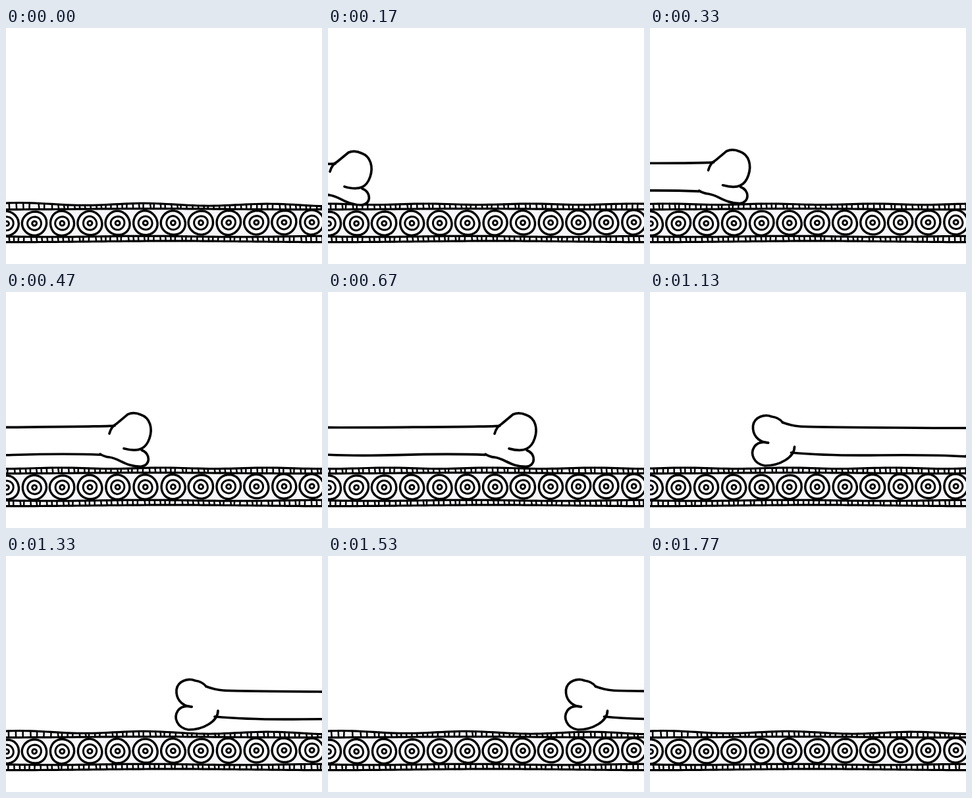
An HTML page with a canvas for the animation above (1.81 s loop, 480 px wide and 360 px high).

```html
<!DOCTYPE html>
<html>
<head>
<meta charset="utf-8">
<title>Bone on a conveyor belt</title>
<style>
html, body { margin: 0; width: 100%; height: 100%; overflow: hidden; background: #fff; }
canvas { display: block; }
</style>
</head>
<body>
<canvas id="stage" width="480" height="360"></canvas>
<script>
const ctx = document.getElementById('stage').getContext('2d');
const LOOP = 1810, STEP = 100 / 3;
ctx.lineCap = ctx.lineJoin = 'round';

// Bone outline, drawn with its right edge at x = 456
const bone = [
  'M99 199Q112 204 125 205T270 207T400 207',
  'M392 219Q395 208 403 204L420 190Q429 186 440 191C454 196 458 212 453 227C448 242 438 249 414 242',
  'M441 245C455 250 455 269 440 270C417 270 407 257 392 255Q384 254 378 250',
  'M378 251Q325 248 245 249T112 245',
  'M117 236C117 252 95 265 72 265C55 262 49 247 56 236C61 229 69 228 77 230',
  'M77 230C60 229 53 216 54 204C56 190 72 186 82 190C90 191 96 195 99 199'
].map(d => new Path2D(d));

// Right edge of the bone at a few steps
const keys = [[5, 67], [14, 221], [20, 317], [28, 456], [40, 661]];

function boneX(i) {
  let k = 1;
  while (k < keys.length - 1 && i > keys[k][0]) k++;
  const [[i0, x0], [i1, x1]] = [keys[k - 1], keys[k]];
  return x0 + (x1 - x0) * (i - i0) / (i1 - i0);
}

const rand = n => {
  const v = Math.sin(n * 127.1 + 11.7) * 43758.5453;
  return v - Math.floor(v);
};

function curve(y, width) {
  ctx.lineWidth = width;
  ctx.beginPath();
  for (let x = -4; x <= 484; x += 8) ctx.lineTo(x, y(x));
  ctx.stroke();
}

function band(top, bottom, i, seed, wide) {
  curve(top, 3.2);
  curve(bottom, 3.2);
  ctx.lineWidth = 2.5;
  ctx.beginPath();
  for (let j = 0, x = 4; x < 482; j++, x += x < wide ? 11 : 8.2) {
    const r = rand(j - 2 * i + seed);
    const tx = x + (r - 0.5) * 3;
    ctx.moveTo(tx, top(tx));
    ctx.lineTo(tx + r * 1.6 - 0.5, bottom(tx));
  }
  ctx.stroke();
}

// A circle by an unsteady hand
function ring(x, y, r, width, seed) {
  const turn = rand(seed) * 7;
  ctx.lineWidth = width;
  ctx.beginPath();
  for (let a = 0; a < 6.2; a += 0.2) {
    const d = r * (1 + 0.02 * Math.sin(2 * a + turn) + 0.015 * Math.sin(3 * a - turn));
    ctx.lineTo(x + d * Math.cos(a), y + d * Math.sin(a));
  }
  ctx.closePath();
  ctx.fill();
  ctx.stroke();
}

function drawBelt(i) {
  const loose = i < 3 || i >= 36;
  ctx.fillStyle = '#f7f7fb';
  ctx.fillRect(0, 270, 480, 54);
  ctx.fillStyle = '#fff';
  for (let n = 0; n < 12; n++) {
    const seed = n * 60 + i;
    const x = 1 + n * 42.15, y = 298.3 - n * 0.18;
    ring(x, y, 18.4, 3.4, seed);
    ring(x, y, 10.3, 3, seed + 0.3);
    ring(x, y, 3.4, 3, seed + 0.6);
  }
  const rim = loose
    ? x => 268.3 + x * 0.004 + 1.7 * Math.sin((x - 70) / 30)
    : x => 268.8 + 0.8 * Math.sin(x / 25 + i);
  band(rim, x => 276.2 + 0.6 * Math.cos(x / 70), i, 0, loose ? 60 : 0);
  band(x => 318 + 0.7 * Math.sin(x / 45), x => 325.8 + 0.9 * Math.cos(x / 80), i, 500, 0);
}

function drawBone(i) {
  // The leading end lifts and settles while the shaft stays level
  const lift = i > 5 && i < 28 ? -4 * Math.sin(Math.PI * (i - 5) / 23) : 0;
  const slope = lift / 225;
  ctx.save();
  ctx.transform(1, slope, 0, 1, boneX(i) - 456, -slope * 215);
  ctx.fillStyle = '#fff';
  ctx.lineWidth = 3.7;
  bone.forEach(p => ctx.fill(p));
  bone.forEach(p => ctx.stroke(p));
  ctx.restore();
}

function frame() {
  const i = Math.min(53, Math.floor((performance.now() % LOOP + 4) / STEP));
  ctx.clearRect(0, 0, 480, 360);
  drawBelt(i);
  if (i < 53) drawBone(i);
  requestAnimationFrame(frame);
}
frame();
</script>
</body>
</html>
```
